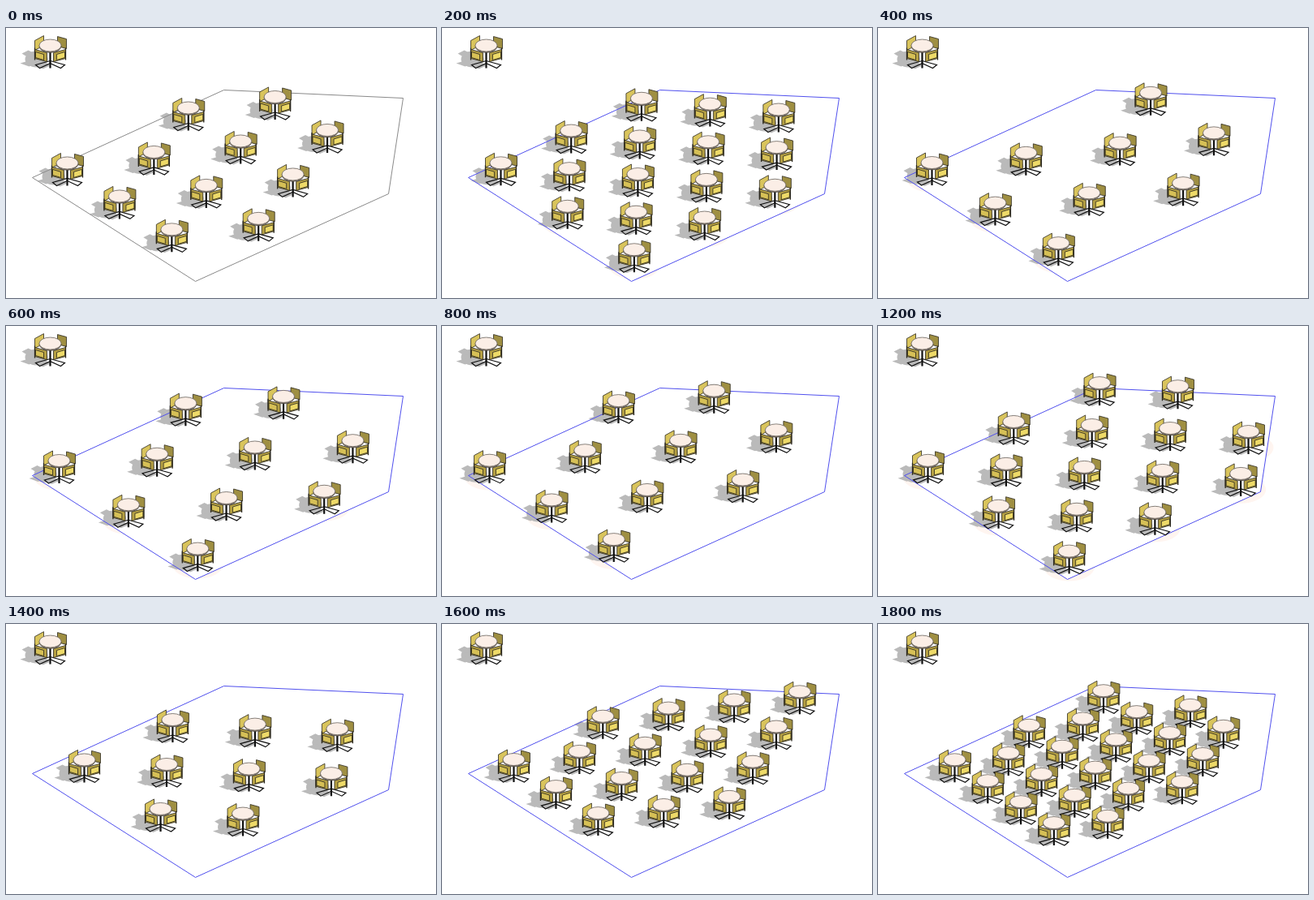
Write an HTML page with a canvas that moves like this. It is 530 by 333 pixels and loops after 2 s.

```html
<!DOCTYPE html>
<html>
<head>
<meta charset="utf-8">
<style>
html, body { margin: 0; height: 100%; overflow: hidden; background: #fff; }
canvas { display: block; }
</style>
</head>
<body>
<canvas id="stage" width="530" height="333"></canvas>
<script>
const ctx = document.getElementById('stage').getContext('2d');
const STEP = 200;
const FLATTEN = 0.543;  // screen height of one unit of ground depth
const LIFT = 20;        // table top above its foot
const HALO = 31;        // clearance circle around a foot
const INK = '#2b281e';
const FLOOR = [[268, 76], [489, 86], [471, 204], [233, 312], [32, 184]];
const CORNER = FLOOR[4];

// Distance of the first table from the left corner, row gap, column gap, column angle.
// A negative angle gives staggered rows, a positive one a square grid.
const layouts = [
  [43, 99.2, 109.7, -13.1],
  [40, 85.9, 85.4, 8.5],
  [34, 120, 118, -11],
  [33, 131.5, 121.6, -7.2],
  [26, 118, 120, -11],
  [33, 105.4, 115.3, -13.1],
  [29, 96, 96.7, 4.4],
  [64, 101.5, 102, 5.8],
  [56, 80, 83, -13],
  [62, 62.8, 68, -13]
].map(place);

function ground(length, degrees) {
  const angle = degrees * Math.PI / 180;
  return [length * Math.cos(angle), length * Math.sin(angle) * FLATTEN];
}

// True if a foot keeps its distance from every edge, measured on the ground.
function fits([x, y], margin) {
  return FLOOR.every(([x0, y0], i) => {
    const [x1, y1] = FLOOR[(i + 1) % FLOOR.length];
    const dx = x1 - x0, dy = (y1 - y0) / FLATTEN;
    const gap = (dx * (y - y0) / FLATTEN - dy * (x - x0)) / Math.hypot(dx, dy);
    return gap > margin * (i === 1 ? 1.1 : 0.85);
  });
}

function place([inset, rowGap, colGap, tilt]) {
  const row = ground(rowGap, tilt > 0 ? 100 - tilt : 49.5);
  const col = ground(colGap, tilt);
  const origin = [CORNER[0] + inset, CORNER[1] + inset * 0.045];
  const feet = [];
  for (let c = 0; c < 8; c++) {
    for (let r = -5; r < 6; r++) {
      const foot = origin.map((v, k) => v + r * row[k] + c * col[k]);
      if (fits(foot, inset * 0.707)) feet.push(foot);
    }
  }
  return feet.sort((p, q) => p[1] - q[1]);
}

function paint(fill, stroke, width = 0.8) {
  if (fill) { ctx.fillStyle = fill; ctx.fill(); }
  if (stroke) { ctx.strokeStyle = stroke; ctx.lineWidth = width; ctx.stroke(); }
}

function poly(points, fill, stroke, width) {
  ctx.beginPath();
  points.forEach(p => ctx.lineTo(...p));
  ctx.closePath();
  paint(fill, stroke, width);
}

function oval(x, y, rx, ry, fill, stroke) {
  ctx.beginPath();
  ctx.ellipse(x, y, rx, ry, 0, 0, 2 * Math.PI);
  paint(fill, stroke);
}

// Upright panel from one top corner to the other.
function panel(x0, y0, x1, y1, height, fill) {
  poly([[x0, y0], [x1, y1], [x1, y1 + height], [x0, y0 + height]], fill, INK);
}

function at([x, y], draw) {
  ctx.save();
  ctx.translate(x, y - LIFT);
  draw();
  ctx.restore();
}

function shadow() {
  const grey = '#bababa';
  oval(-17, 17, 14, 10, grey);
  poly([[-35, 10], [-27, 6], [-17, 11], [-27, 15]], grey);
  poly([[-37, 22], [-27, 19], [-16, 22], [-26, 26]], grey);
  poly([[-18, 25], [-8, 19], [0, 25], [-9, 29]], grey);
}

function table() {
  panel(-19, -6, -8, -12, 12, '#d9c45c');
  panel(9, -11, 20, -8, 12, '#9f8f42');
  for (const side of [-1, 1]) {
    poly([[0, 19], [side * 18, 24], [side * 13, 28], [0, 22]], null, '#111', 1.2);
    panel(side * 19, 5, side * 4, 9, 11, '#b5a043');
    panel(side * 18, 8, side * 8, 11, 7, side < 0 ? '#d6c056' : '#eeda68');
    poly([[side * 19, 3], [side * 19, 18]], null, INK, 1.3);
  }
  poly([[0, 8], [0, 28]], null, '#111', 2.2);
  oval(0, 1, 13.5, 7.8, '#8a7d70', '#4a443e');
  oval(0, 0, 13.5, 7.5, '#fbeee6', '#6d6660');
}

function render(time) {
  const index = Math.floor(time / STEP) % layouts.length;
  const feet = layouts[index];
  const spots = [[54, 41], ...feet];
  ctx.fillStyle = '#fff';
  ctx.fillRect(0, 0, 530, 333);
  ctx.save();
  ctx.translate(0.5, 0.5);
  feet.forEach(([x, y]) => oval(x, y, HALO, HALO * FLATTEN, '#fff5f0'));
  poly(FLOOR, '#fff');
  spots.forEach(p => at(p, shadow));
  poly(FLOOR, null, index ? '#5050ee' : '#8a8a8a', 1);
  spots.forEach(p => at(p, table));
  ctx.restore();
}

function tick() {
  render(performance.now());
  requestAnimationFrame(tick);
}
tick();
</script>
</body>
</html>
```
